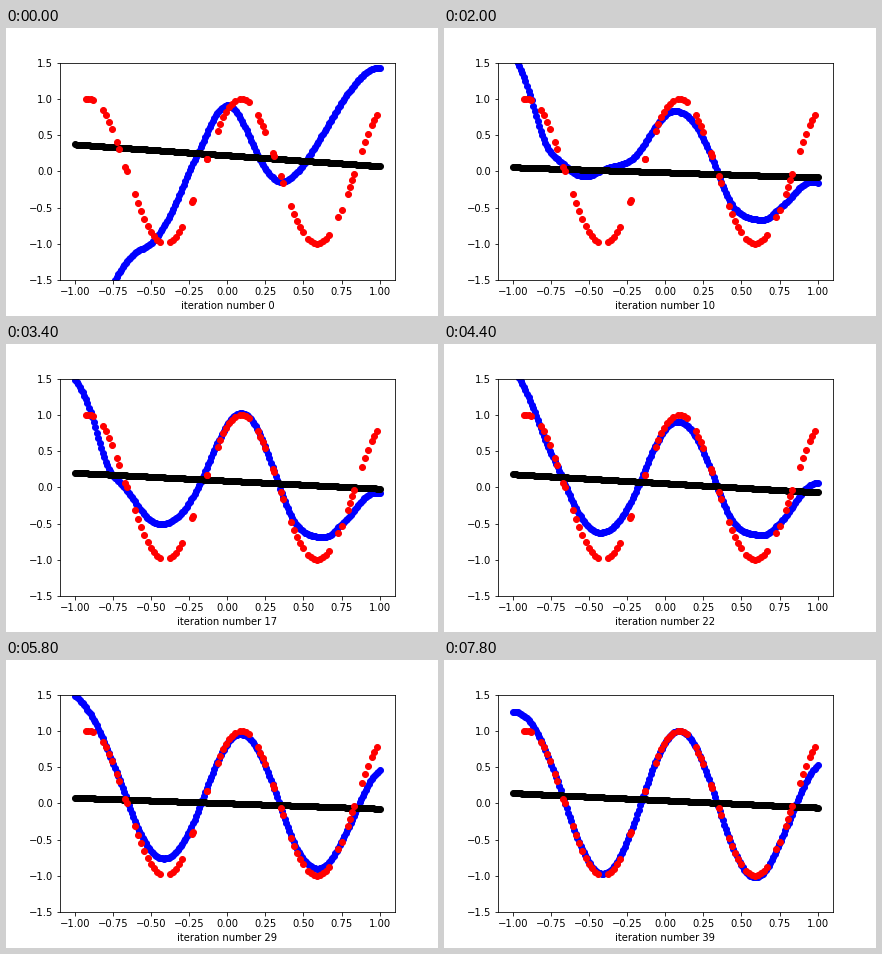
A matplotlib script that plays this animation: 432x288 px, repeating every 8 s.

```python
import numpy as np
import matplotlib.pyplot as plt
from matplotlib.animation import FuncAnimation

STEPS = 40
KEYS = [0, 6, 10, 17, 22, 29, 39]

# The samples fall into short runs along the x axis
RUNS = [(-.93, -.88), (-.82, -.76), (-.725, -.71), (-.67, -.66), (-.61, -.44),
        (-.38, -.3), (-.23, -.225), (-.133, -.133), (-.065, .05), (.08, .14),
        (.2, .25), (.3, .307), (.35, .365), (.42, .5), (.53, .67),
        (.73, .75), (.79, .835), (.885, .925), (.95, .98)]


def wave(x):
    return np.cos(2 * np.pi * (x - .09))


def bump(x, centre, width):
    return np.exp(-((x - centre) / width) ** 2)


def ramp(x, start, end, power):
    return np.clip((x - start) / (end - start), 0, None) ** power


def smooth(x, start, end):
    u = np.clip((x - start) / (end - start), 0, 1)
    return u * u * (3 - 2 * u)


def track(step, *values):
    return np.interp(step, KEYS[-len(values):], values)


def first_guess(x):
    return (1.15 * bump(x, 0, .21) - .24 + 1.67 * smooth(x, .3, 1)
            - .8 * smooth(x, -.2, -.55) - 8 * ramp(x, -.5, -1.5, 2))


def trained(x, step):
    """The wave plus errors that fade as the steps go on."""
    return (wave(x)
            + track(step, .74, .78, .65, .80, .64, .42) * ramp(x, -.75, -1, 2)
            + track(step, -.4, -.38, -.45, -.1, 0, 0) * bump(x, -.79, .12)
            + track(step, 1.19, 1.03, .5, .38, .24, .03) * bump(x, -.39, .21)
            + track(step, -.28, -.19, .02, -.1, -.05, 0) * bump(x, .12, .15)
            + track(step, .42, .34, .32, .35, .1, -.02) * bump(x, .58, .14)
            - track(step, .95, 1.01, .93, .79, .39, .32) * ramp(x, .72, 1, 1.3))


def fitted(x, step):
    left = max(0, 1 - step / KEYS[1]) ** 2
    return left * first_guess(x) + (1 - left) * trained(x, step)


def flat_line(x, step):
    height = track(step, .22, -.08, -.015, .09, .055, 0, .04)
    slope = track(step, .15, .065, .07, .11, .125, .075, .1)
    return height - slope * x


fig, ax = plt.subplots(figsize=(6, 4), dpi=72)
fig.subplots_adjust(left=.125, right=.9, bottom=.125, top=.88)
ax.set(xlim=(-1.1, 1.1), ylim=(-1.5, 1.5))

grid = np.linspace(-1, 1, 200)
samples = np.concatenate([np.linspace(a, b, 2 + int((b - a) / .022))
                          for a, b in RUNS])
fit, = ax.plot([], [], "bo")
flat, = ax.plot([], [], "ko")
ax.plot(samples, wave(samples), "ro")


def draw(step):
    fit.set_data(grid, fitted(grid, step))
    flat.set_data(grid, flat_line(grid, step))
    ax.set_xlabel(f"iteration number {step}")
    return fit, flat


anim = FuncAnimation(fig, draw, frames=STEPS, interval=200,
                     init_func=lambda: draw(0), repeat=True, repeat_delay=0)
plt.show()
```
